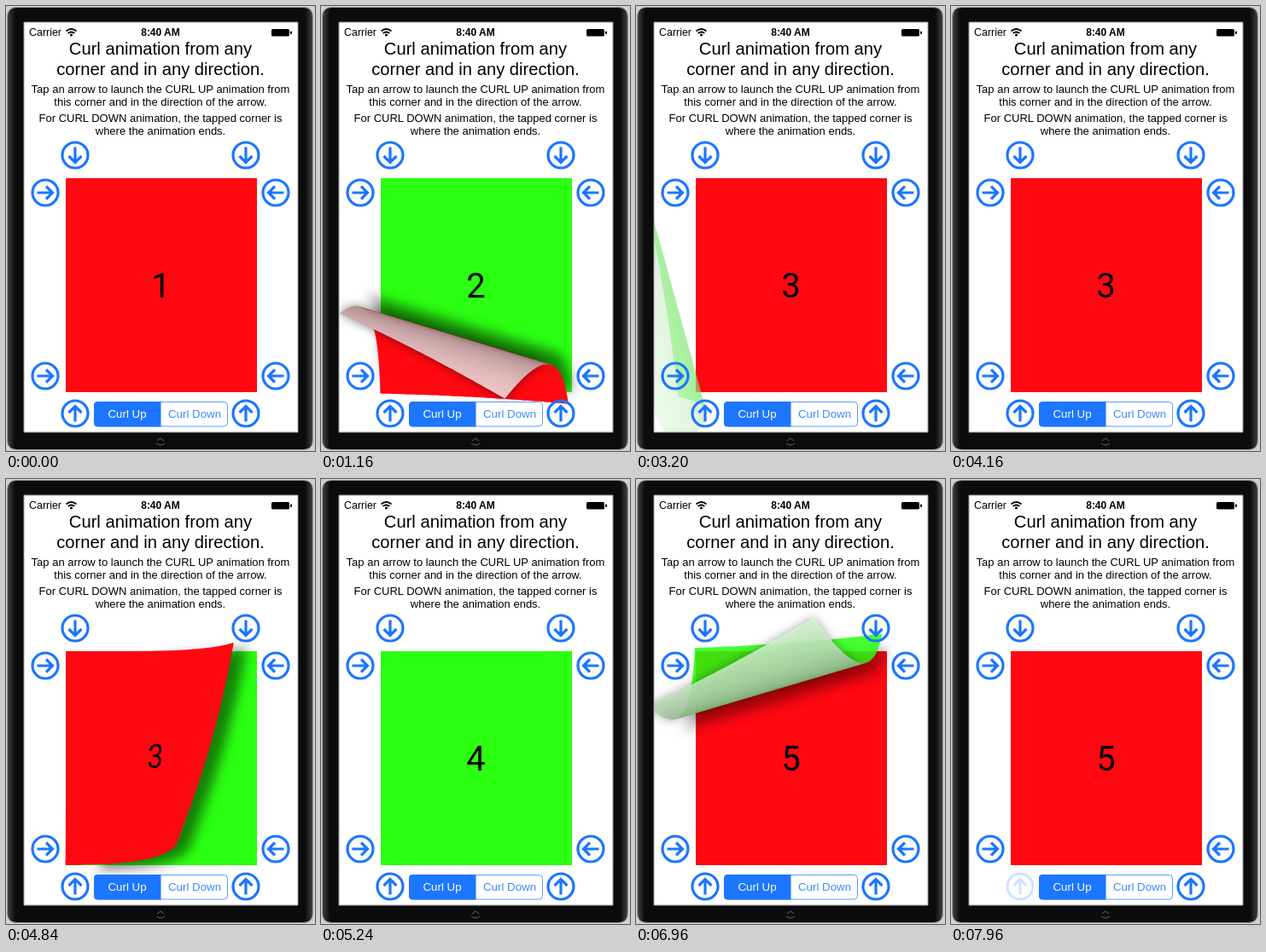
Animation of 362 by 522 pixels, one loop 8 s. Source, as an HTML page with a canvas:

```html
<!DOCTYPE html>
<html>
<head>
<meta charset="utf-8">
<title>Page curl</title>
<style>
  html, body { margin: 0; width: 100%; height: 100%; overflow: hidden; background: #fff; }
  canvas, svg { position: absolute; left: 0; top: 0; width: 362px; height: 522px; }
  text { font-family: "Liberation Sans", Arial, sans-serif; text-anchor: middle; }
  .title { font-size: 20.2px; }
  .note { font-size: 13px; }
  .button { fill: none; stroke: #1c76ff; stroke-width: 3.2; }
</style>
</head>
<body>
<canvas id="stage" width="362" height="522"></canvas>
<svg id="ui" viewBox="0 0 362 522">
  <defs>
    <linearGradient id="rim">
      <stop offset="0" stop-color="#444"/><stop offset=".025" stop-color="#0c0c0c"/>
      <stop offset=".975" stop-color="#0c0c0c"/><stop offset="1" stop-color="#444"/>
    </linearGradient>
  </defs>
  <path fill="#d0d0d0" fill-rule="evenodd" d="M0 0H362V522H0ZM21 19V500H342V19Z"/>
  <path fill="url(#rim)" stroke="#999" fill-rule="evenodd" d="M13 1.500H348Q359.500 1.500 359.500 13V509Q359.500 520.500 348 520.500H13Q1.500 520.500 1.500 509V13Q1.500 1.500 13 1.500Z M21 19V500H342V19Z"/>
  <path d="M177 510l4 -3 4 3M176 513q5 4 10 0" fill="none" stroke="#666"/>

  <text x="46" y="35" font-size="12.4">Carrier</text>
  <g fill="none" stroke="#000" stroke-width="1.7">
    <path d="M70.5 29.5q6 -5 12 0M72.7 32q3.8 -3 7.6 0"/>
    <circle cx="76.5" cy="34" r=".7"/>
  </g>
  <text x="181" y="35" font-size="12" font-weight="bold">8:40 AM</text>
  <rect x="311" y="27" width="21" height="8.5" rx="1.5"/>
  <rect x="333" y="29.5" width="2" height="3.5" rx="1"/>

  <text class="title" x="181" y="57">Curl animation from any</text>
  <text class="title" x="181" y="81">corner and in any direction.</text>
  <text class="note" x="181" y="102">Tap an arrow to launch the CURL UP animation from</text>
  <text class="note" x="181" y="117">this corner and in the direction of the arrow.</text>
  <text class="note" x="181" y="136">For CURL DOWN animation, the tapped corner is</text>
  <text class="note" x="181" y="151">where the animation ends.</text>

  <rect x="103.5" y="464.5" width="156" height="28.5" rx="4" fill="none" stroke="#5a9bff"/>
  <path d="M181.500 464H107.500q-4.500 0 -4.500 4V489q0 4.500 4.500 4.500H181.500Z" fill="#1c76ff"/>
  <text x="142" y="483" font-size="13.3" fill="#fff">Curl Up</text>
  <text x="221" y="483" font-size="13.3" fill="#3d8aff">Curl Down</text>
</svg>
<script>
const LOOP = 8000, RADIUS = 150, SPEED = 0.6, CURL_TIME = 900;
const PAGE = { x: 70, y: 202, w: 224, h: 251 };
const RED = [255, 8, 18], GREEN = [43, 255, 18];

// Button centres with the rotation of their arrow.
const buttons = [
  [81, 175, 90], [281, 175, 90], [46, 219, 0], [316, 219, 180],
  [46, 434, 0], [316, 434, 180], [81, 478, -90], [281, 478, -90]
].map(([x, y, turn]) => {
  const g = document.createElementNS('http://www.w3.org/2000/svg', 'g');
  g.setAttribute('class', 'button');
  g.setAttribute('transform', `translate(${x} ${y}) rotate(${turn})`);
  g.innerHTML = '<circle r="15"/><path d="M-9.500 0H8M1 -7.500L8.500 0L1 7.500"/>';
  document.getElementById('ui').append(g);
  return g;
});

// Each curl: release time, button, starting corner height, arrow heading
// and the side to which the curl leans away from that heading.
const curls = [
  { start: 550, button: 1, y: 202, heading: Math.PI / 2, lean: 1 },
  { start: 2490, button: 3, y: 202, heading: Math.PI, lean: -1 },
  { start: 4430, button: 5, y: 453, heading: Math.PI, lean: 1 },
  { start: 6320, button: 7, y: 453, heading: -Math.PI / 2, lean: -1 },
  { start: 8040, button: 6, y: 453, heading: -Math.PI / 2, lean: 1 }
];

const ctx = document.getElementById('stage').getContext('2d');
const layer = document.createElement('canvas');
layer.width = 362;
layer.height = 522;
const pen = layer.getContext('2d');

const rgb = c => `rgb(${c.map(Math.round)})`;
const clamp = v => Math.min(1, Math.max(0, v));
const pageColor = n => n % 2 ? RED : GREEN;

function drawPage(c, n) {
  c.fillStyle = rgb(pageColor(n));
  c.fillRect(PAGE.x, PAGE.y, PAGE.w, PAGE.h);
  c.fillStyle = '#000';
  c.font = '400 40px Roboto, sans-serif';
  c.textAlign = 'center';
  c.fillText(n, 181.5, 341.5);
}

function backColor(n, angle, alpha) {
  const light = 1 - alpha * (0.4 + 0.45 * Math.cos(angle));
  return rgb(pageColor(n).map(v => (v * 0.18 + 255 * 0.82) * light));
}

// Distance u from the tapped corner, after wrapping round the cylinder.
const wrap = (u, front) =>
  u >= front ? u : front - RADIUS * Math.sin((front - u) / RADIUS);

// Paint one band of the page, u from a to b, at its wrapped place.
function paintBand(curl, a, b) {
  const { n, front, heading, alpha } = curl;
  const from = wrap(a, front), k = (wrap(b, front) - from) / (b - a);
  if (Math.abs(k) < 1e-4) return;
  const angle = (front - (a + b) / 2) / RADIUS;
  pen.save();
  pen.translate(294, curl.y);
  pen.rotate(heading);
  pen.translate(from - k * a, 0);
  pen.scale(k, 1);
  pen.beginPath();
  pen.rect(a - 0.8, -500, b - a + 1.6, 1000);
  pen.clip();
  pen.rotate(-heading);
  pen.translate(-294, -curl.y);
  if (angle <= Math.PI / 2) drawPage(pen, n);
  else {
    pen.fillStyle = backColor(n, angle, alpha);
    pen.fillRect(PAGE.x, PAGE.y, PAGE.w, PAGE.h);
  }
  pen.restore();
}

// Fill the layer with the part of the page between two bend angles.
function paintPart(curl, lowAngle, highAngle) {
  pen.clearRect(0, 0, 362, 522);
  const high = Math.min(curl.front - lowAngle * RADIUS, 400);
  const low = Math.max(curl.front - highAngle * RADIUS, 0);
  for (let u = high; u > low; u -= 4) paintBand(curl, Math.max(u - 4, low), u);
}

function stampLayer(alpha) {
  ctx.globalAlpha = alpha;
  ctx.drawImage(layer, 0, 0);
  ctx.globalAlpha = 1;
}

function stampShadow(curl, alpha, offset, blur) {
  ctx.save();
  ctx.filter = `brightness(0) blur(${blur}px)`;
  ctx.globalAlpha = alpha;
  ctx.drawImage(layer, -Math.cos(curl.heading) * offset, -Math.sin(curl.heading) * offset);
  ctx.restore();
}

function drawCurl({ y, heading, lean }, n, front) {
  const curl = {
    y, n, front,
    heading: heading + lean * (0.46 - 0.00045 * front),
    alpha: 1 - clamp((front - 370) / 110)
  };
  const shade = 1 - clamp((front - 370) / 50);
  paintPart(curl, 0.4, Math.PI / 2);
  stampShadow(curl, 0.5 * shade, 16, 7);
  paintPart(curl, -9, Math.PI / 2);
  stampLayer(curl.alpha);
  paintPart(curl, Math.PI / 2, 9);
  stampShadow(curl, 0.5 * shade, 0, 6);
  stampLayer(curl.alpha);
}

function draw(t) {
  ctx.fillStyle = '#fff';
  ctx.fillRect(0, 0, 362, 522);
  const done = curls.filter(c => t >= c.start + CURL_TIME).length;
  const curl = curls[done];
  const age = t - curl.start;
  if (age > 0) {
    drawPage(ctx, done + 2);
    drawCurl(curl, done + 1, age * SPEED);
  } else drawPage(ctx, done + 1);

  buttons.forEach(b => b.setAttribute('opacity', 1));
  for (const c of curls) {
    const since = t - c.start;
    if (since > -120) buttons[c.button].setAttribute('opacity', 0.2 + 0.8 * clamp(since / 250));
  }
}

function tick() {
  draw(performance.now() % LOOP);
  requestAnimationFrame(tick);
}
tick();
</script>
</body>
</html>
```
